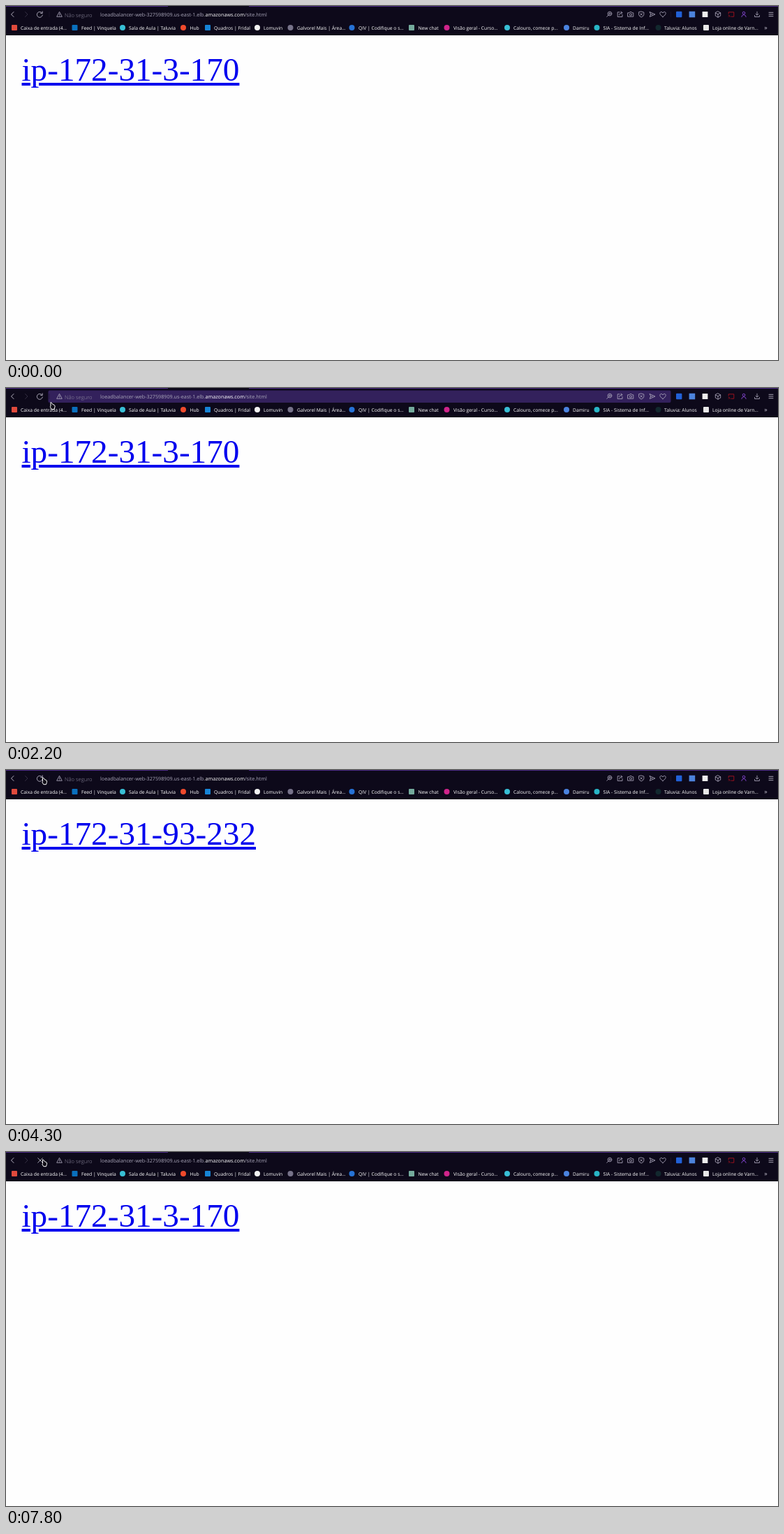
Recreate the animation shown at these times as an HTML page. Size 1106x507 px, loop 8 s.

```html
<!DOCTYPE html>
<html lang="pt-BR">
<head>
<meta charset="utf-8">
<title>Balanceador de carga</title>
<style>
  html, body { margin: 0; width: 100%; height: 100%; overflow: hidden; background: #fefefe; }
  svg { position: absolute; left: 0; top: 0; }
  text { font-family: "Open Sans", "Noto Sans", sans-serif; font-size: 6.75px; fill: #fff; text-rendering: geometricPrecision; white-space: pre; }
  #host { position: absolute; left: 22.5px; top: 68.4px; font: 47.2px/47.2px "Liberation Serif", serif; color: #00e;
    white-space: nowrap; text-decoration: underline; text-decoration-thickness: 4.4px; text-underline-offset: 2.6px; }
  .icon { fill: none; stroke: #aaa6ba; stroke-width: .85; stroke-linecap: round; stroke-linejoin: round; }
  .tip rect { fill: #150f2b; stroke: #c9c6d6; stroke-width: .8; }
</style>
</head>
<body>
<div id="host"></div>
<svg width="1106" height="507" viewBox="0 0 1106 507">
  <rect width="1106" height="42" fill="#0d091a"/>
  <path d="M0 .5H232M348 .5H1106" stroke="#4b2a86"/>
  <rect id="addressHover" x="60.5" y="3.5" width="892" height="17.5" rx="2" fill="#33215c"/>
  <rect id="bookmarkHover" x="4" y="23" width="86" height="16.5" rx="2" fill="#262039"/>
  <path d="M62 8V16M952.5 8V16" stroke="#211b33" stroke-width=".7"/>

  <g class="icon">
    <path d="M11 8.5 7.5 12 11 15.5" stroke="#d2cfdd"/>
    <path d="M27.5 8.5 31 12 27.5 15.5" stroke="#3b364a"/>
    <path id="reload" d="M51.6 10A4 4 0 1 0 52.3 13M52.2 7.8V10.4H49.6" stroke="#c4c1d0"/>
    <path id="stop" d="M45.7 8.7 52.3 15.3M52.3 8.7 45.7 15.3" stroke="#c4c1d0"/>
    <path d="M76.7 8.6 80.3 15.3H73.1ZM76.7 11V12.8M76.7 14V14.1"/>
    <path d="M867.9 11A2.9 2.9 0 1 1 862.1 11A2.9 2.9 0 1 1 867.9 11M863 13.1 860.8 15.4M863.6 11H866.4M865 9.6V12.4"/>
    <path d="M879 8.8H876.2V15.5H883V12.5M878.5 13.1C878.7 10.7 880 9.7 882.6 9.6M881 8 883 9.6 881.2 11.4"/>
    <path d="M891 9.8H893L893.8 8.6H896.2L897 9.8H898.8V15.2H891ZM896.6 12.4A1.6 1.6 0 1 1 893.4 12.4A1.6 1.6 0 1 1 896.6 12.4"/>
    <path d="M910.2 8 913.8 9V12.5Q913.5 14.8 910.2 16Q906.9 14.8 906.6 12.5V9ZM908.9 10.6 911.5 13.2M911.5 10.6 908.9 13.2"/>
    <path d="M922.3 8.6 930 12 922.3 15.4 923.5 12ZM923.5 12H926.5"/>
    <path d="M941 15.5C934.5 11.5 937 8 939 8.4Q940.3 8.6 941 10Q941.7 8.6 943 8.4C945 8 947.5 11.5 941 15.5Z"/>
    <path d="M1020 7.8 1023.7 9.8V14.1L1020 16.2 1016.3 14.1V9.8ZM1016.3 9.8 1020 11.8 1023.7 9.8M1020 11.8V16.2"/>
    <path d="M1035.2 11V8.8H1042.8V15.2H1039M1035.2 13Q1037 13.2 1037.2 15.2M1035.2 15.2V15.1" stroke="#b3131f"/>
    <path d="M1058.8 10A1.8 1.8 0 1 1 1055.2 10A1.8 1.8 0 1 1 1058.8 10M1053.8 15.6Q1054 12.6 1057 12.6T1060.2 15.6" stroke="#8a49d8"/>
    <path d="M1076 8.2V13M1074 11.2 1076 13.2 1078 11.2M1072.6 13.4V15.5H1079.4V13.4"/>
    <path d="M1093 9.3H1099M1093 12H1099M1093 14.7H1099" stroke="#c4c1d0"/>
  </g>
  <rect x="960" y="7.7" width="8.4" height="8.6" rx="1" fill="#2161d8"/>
  <rect x="978.6" y="7.7" width="8.6" height="8.6" fill="#4d83dc"/>
  <rect x="997.6" y="8" width="7.8" height="8" fill="#eee"/>

  <text x="84" y="15.6" style="font-size:7.65px;font-weight:300;fill:#9692a6">Não seguro</text>
  <text x="135" y="14.6" style="font-size:7.22px;fill:#aaa7ba">loeadbalancer-web-327598909.us-east-1.elb.<tspan fill="#fff">amazonaws.com</tspan>/site.html</text>
  <g id="bookmarks"></g>
  <text x="1086.3" y="33.6" style="font-size:9px;fill:#c4c1d0">»</text>

  <g class="tip" id="mailTip">
    <rect x="79.5" y="40.5" width="478.5" height="23"/>
    <text x="84" y="50.2">Caixa de entrada (479) - tulio.marvenda@jevu.net - E-mail de Jevu</text>
    <text x="84" y="60">https://mail.google.com/mail/u/0/#inbox?compose=GTvVlcRwRdsCBkQjQQkLFvDmkJpTlWpkTzDTdRHWXdXWSzSBCnnkRCPLhPgDXzWqJzKFlKjfgzGSM</text>
  </g>
  <g class="tip" id="reloadTip">
    <rect x="58.5" y="21" width="43" height="14.5"/>
    <text x="63" y="30.8">Recarregar</text>
  </g>
  <g class="tip" id="stopTip">
    <rect x="58.5" y="21" width="25" height="14.5"/>
    <text x="63" y="30.8">Parar</text>
  </g>
  <path id="cursor" d="M1.5 .8Q2.3 .5 3 1.7L4.2 3.5 7 4.8Q7.8 5.5 7.5 7.4L6.5 10.7H2.8L1 7.8Q.5 6.9 1.5 6.5Z"
    fill="#100d18" stroke="#fff" stroke-width="1" stroke-linejoin="round"/>
</svg>
<script>
const LOOP = 8000, STEP = 100;
const byId = id => document.getElementById(id);
const show = (id, visible) => byId(id).style.display = visible ? '' : 'none';
const within = (t, ...spans) => spans.some(([from, to]) => t >= from && t < to);

// Icon centre, label start, label, icon colour, icon shape
const bookmarks = [
  [12, 21, 'Caixa de entrada (4...', '#e04a3c', 'square'],
  [98.5, 108, 'Feed | Vinquela', '#0a70bd', 'square'],
  [167, 176, 'Sala de Aula | Taluvia', '#38bfd5', 'circle'],
  [254, 263.5, 'Hub', '#f04a2c', 'circle'],
  [289, 298, 'Quadros | Fridal', '#1684d6', 'square'],
  [360, 369, 'Lomuvin', '#f2f2f2', 'circle'],
  [407.5, 417, 'Galvorel Mais | Área...', '#77738a', 'circle'],
  [495.5, 505, 'QIV | Codifique o s...', '#2672d6', 'circle'],
  [581, 590.5, 'New chat', '#74aa9c', 'square'],
  [631.5, 641, 'Visão geral - Curso...', '#d0248b', 'circle'],
  [718, 727, 'Calouro, comece p...', '#38bfd5', 'circle'],
  [803, 812, 'Damiru', '#4b83e0', 'circle'],
  [846.5, 855.5, 'SIA - Sistema de Inf...', '#28b5c6', 'circle'],
  [934.5, 943, 'Taluvia: Alunos', '#12282e', 'circle'],
  [1003, 1012, 'Loja online de Varn...', '#e8e8e8', 'square']
];
byId('bookmarks').innerHTML = bookmarks.map(([cx, x, label, color, shape]) =>
  `<rect x="${cx - 4}" y="27" width="8" height="8" rx="${shape === 'circle' ? 4 : 1}" fill="${color}"/>` +
  `<text x="${x}" y="33.5">${label}</text>`).join('');

// Time, x, y
const cursorKeys = [
  [600, 65, 23], [700, 65, 23], [900, 72, 29.5], [2000, 72, 29.5],
  [2400, 53, 10], [2500, 53, 10], [2700, 51, 10], [LOOP, 51, 10]
];

function cursorAt(t) {
  if (t < 600) {
    const k = 1 - (1 - (t - 100) / 500) ** 1.5;
    const curve = (a, b, c) => (1 - k) ** 2 * a + 2 * k * (1 - k) * b + k * k * c;
    return [curve(994, 520, 65), curve(-2, 174, 23)];
  }
  const i = cursorKeys.findIndex(key => key[0] > t);
  const [t0, x0, y0] = cursorKeys[i - 1], [t1, x1, y1] = cursorKeys[i];
  const k = (t - t0) / (t1 - t0);
  return [x0 + (x1 - x0) * k, y0 + (y1 - y0) * k];
}

function draw(now) {
  const t = Math.floor(now % LOOP / STEP) * STEP;
  show('cursor', t >= 100);
  if (t >= 100) byId('cursor').setAttribute('transform', `translate(${cursorAt(t)})`);

  show('bookmarkHover', within(t, [600, 2200]));
  show('addressHover', within(t, [2200, 2700]));
  byId('addressHover').style.opacity = t === 2600 ? .5 : 1;

  show('mailTip', within(t, [1400, 2100]));
  show('reloadTip', within(t, [3100, 4000]));
  show('stopTip', within(t, [4700, 5100], [6000, 6100], [6900, 7000]));

  const loading = within(t, [4100, 4300], [5300, 5500], [6300, 6400], [7100, 7300], [7800, LOOP]);
  show('stop', loading);
  show('reload', !loading);
  byId('host').textContent = within(t, [4300, 5500], [6400, 7300]) ? 'ip-172-31-93-232' : 'ip-172-31-3-170';
}

const start = performance.now();
function tick() {
  draw(performance.now() - start);
  requestAnimationFrame(tick);
}
tick();
</script>
</body>
</html>
```
